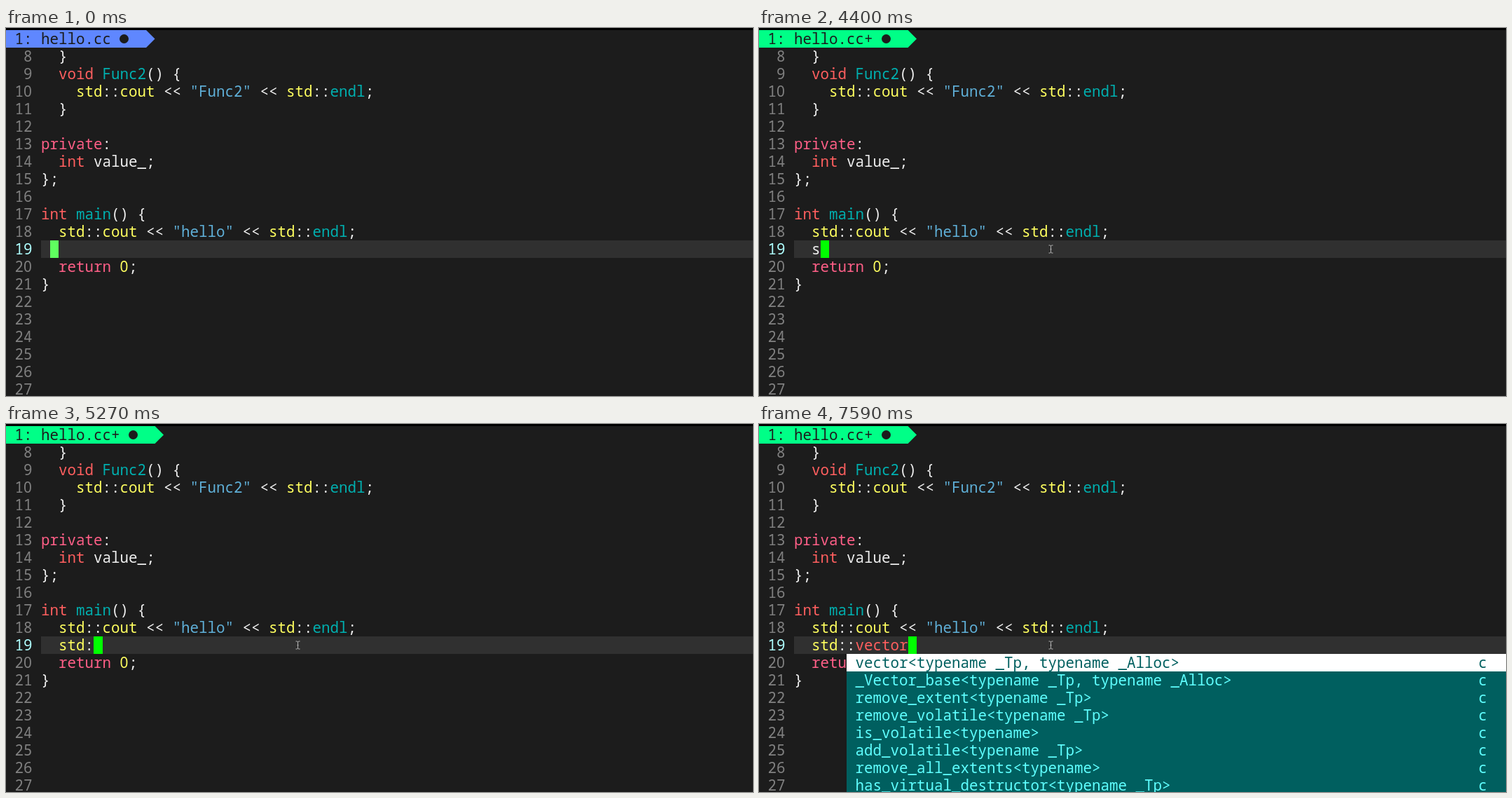
Animation of 1066x525 px, one loop 8 s. Source, as an HTML page:

```html
<!DOCTYPE html>
<html lang="en">
<head>
<meta charset="utf-8">
<title>Code completion</title>
<style>
  html, body { margin: 0; width: 100%; height: 100%; overflow: hidden; background: #1c1c1c; }
  #stage {
    position: relative; width: 1066px; height: 525px; overflow: hidden;
    background: #1c1c1c; color: #eee;
    font: 20.833px/25px "Noto Sans Mono", monospace;
    font-variant-ligatures: none; white-space: pre;
  }
  #stage > * { position: absolute; }
  #edge { left: 0; top: 0; width: 100%; height: 3px; background: #000; }
  #tab {
    left: 0; top: 3px; height: 25px; color: #1c1c1c; background: #5f87ff;
    clip-path: polygon(0 0, calc(100% - 12.5px) 0, 100% 50%, calc(100% - 12.5px) 100%, 0 100%);
  }
  #tab.dirty { background: #00ff87; }
  #tab i {
    position: absolute; right: 37.5px; top: 6px; width: 13px; height: 13px;
    border-radius: 50%; background: #1c1c1c;
  }
  #line { left: 50px; top: 303px; width: 1016px; height: 25px; background: #303030; }
  #caret { top: 303px; width: 12.5px; height: 25px; background: #5fff5f; }
  #caret.live { background: #0f0; }
  .row { left: 0; height: 25px; }
  .no { color: #808080; }
  .now { color: #afffff; }
  .red { color: #ff5f5f; }
  .pink { color: #ff5f87; }
  .teal { color: #00afaf; }
  .yellow { color: #ffff5f; }
  .blue { color: #5fafd7; }
  .zero { font-family: "Noto Sans", sans-serif; letter-spacing: .028em; }
  #menu { top: 328px; right: 0; height: 200px; overflow: hidden; background: #005f5f; color: #5fffff; }
  #menu div { position: relative; height: 25px; padding-left: 12.5px; }
  #menu .on { background: #fff; color: #005f5f; }
  #menu b { position: absolute; right: 27px; font-weight: normal; }
  #mouse { left: 0; top: 0; }
</style>
</head>
<body>
<div id="stage">
  <div id="edge"></div>
  <div id="tab"><span></span><i></i></div>
  <div id="line"></div>
  <div id="caret"></div>
  <div id="menu"></div>
  <svg id="mouse" width="9" height="13" viewBox="-4.5 -6.5 9 13" fill="none" stroke="#b4b4b4" stroke-width="1">
    <path d="M-3 -5.5H-1L0 -4.5L1 -5.5H3M-3 5.5H-1L0 4.5L1 5.5H3M0 -4.5V4.5M-1 0H1"/>
  </svg>
</div>
<script>
const LOOP = 8000, CELL = 12.5, ROW = 25, TOP = 28, FIRST = 8, ACTIVE = 19;
const $ = id => document.getElementById(id);

const code = `  }
  void Func2() {
    std::cout << "Func2" << std::endl;
  }

private:
  int value_;
};

int main() {
  std::cout << "hello" << std::endl;

  return 0;
}`.split("\n");

const menus = {
  st: { col: 5, items: ["size_t", "sigset_t", "ssize_t", "suseconds_t", "std::", "stdin",
    "stime( const time_t *__when )", "static"] },
  std: { col: 5, items: ["std::", "stdin", "stderr", "stdout", "STDC_HEADERS", "STA_DEL",
    "strtod( const char *__restrict __nptr, char **__restrict __endptr )",
    "strtold( const char *__restrict __nptr, char **__restrict __endptr )"] },
  scope: { col: 10, items: ["calloc( size_t __nmemb, size_t __size )",
    "front_insert_iterator<typename _Container>",
    "moneypunct_byname<typename _CharT, bool _Intl>", "isxdigit( int )",
    "printf( const char *__restrict __format, ... )",
    "wcstok( wchar_t *__restrict __s, const wchar_t *__restrict __delim, wchar_t **__restrict __ptr )",
    "sprintf( char *__restrict __s, const char *__restrict __format, ... )",
    "add_pointer<typename _Tp>"] },
  vec: { col: 10, kind: "c", items: ["vector<typename _Tp, typename _Alloc>",
    "_Vector_base<typename _Tp, typename _Alloc>", "remove_extent<typename _Tp>",
    "remove_volatile<typename _Tp>", "is_volatile<typename>", "add_volatile<typename _Tp>",
    "remove_all_extents<typename>", "has_virtual_destructor<typename _Tp>"] }
};

// Each step: start time, typed text, open menu, first item picked
const steps = [
  [0, ""], [4400, "s"], [4550, "st"], [4640, "st", "st"],
  [4790, "std"], [4870, "std", "std"],
  [5270, "std:"], [5350, "std::"], [5420, "std::", "scope"],
  [6490, "std::v"], [6580, "std::ve"], [6670, "std::ve", "vec"],
  [7590, "std::vector", "vec", true]
];

// Each move: start, end, number of hops, from, to
const moves = [
  [110, 600, 7, [900, 492], [507, 242]],
  [820, 990, 3, [500, 243], [466, 251]],
  [2850, 3170, 5, [465, 253], [414, 324]],
  [3400, 3400, 1, [416, 315], [416, 315]]
];

const rules = [
  ["blue", /"[^"]*"/], ["yellow", /\b(?:std|cout|0)\b/], ["teal", /\b(?:Func2|endl|main)\b/],
  ["red", /\b(?:void|int|vector)\b/], ["pink", /\b(?:private|return)\b/]
];
const lexer = new RegExp(rules.map(r => `(${r[1].source})`).join("|"), "g");
const escape = s => s.replace(/</g, "&lt;").replace(/>/g, "&gt;");
const plainZero = s => s.replace(/0/g, '<span class="zero">0</span>');

function paint(text) {
  let html = "", end = 0;
  for (const m of text.matchAll(lexer)) {
    const name = rules[m.slice(1).findIndex(g => g !== undefined)][0];
    html += escape(text.slice(end, m.index)) +
      `<span class="${name}">${plainZero(escape(m[0]))}</span>`;
    end = m.index + m[0].length;
  }
  return html + escape(text.slice(end));
}

function addRow(n) {
  const row = document.createElement("div");
  row.className = "row";
  row.style.top = TOP + (n - FIRST) * ROW + "px";
  const tone = n === ACTIVE ? "now" : "no";
  row.innerHTML = `<span class="${tone}">${plainZero(String(n).padStart(3))}</span> <span>${paint(code[n - FIRST] || "")}</span>`;
  $("stage").insertBefore(row, $("menu"));
  return row.lastChild;
}

let typed;
for (let n = FIRST; n <= 27; n++) {
  const text = addRow(n);
  if (n === ACTIVE) typed = text;
}

function showStep([, text, menuName, picked]) {
  const dirty = text !== "";
  $("tab").className = dirty ? "dirty" : "";
  $("tab").firstChild.textContent = dirty ? " 1: hello.cc+" : " 1: hello.cc";
  $("tab").style.width = (dirty ? 18 : 17) * CELL + "px";
  typed.innerHTML = paint("  " + text);

  const menu = menus[menuName];
  $("menu").hidden = !menu;
  if (!menu) return;
  $("menu").style.left = menu.col * CELL + "px";
  $("menu").innerHTML = menu.items.map((item, i) =>
    `<div${picked && i === 0 ? ' class="on"' : ""}>${escape(item)}${menu.kind ? `<b>${menu.kind}</b>` : ""}</div>`
  ).join("");
}

function mouseAt(t) {
  const move = moves.findLast(m => t >= m[0]);
  if (!move) return null;
  const [start, end, hops, from, to] = move;
  const last = hops - 1;
  const hop = last ? Math.min(last, Math.floor((t - start) / (end - start) * last + .05)) : 0;
  const p = last ? hop / last : 1;
  const eased = p * (2 - p);
  return from.map((v, i) => Math.round(v + (to[i] - v) * eased));
}

let shown;
function draw(now) {
  const t = now % LOOP;
  const step = steps.findLast(s => t >= s[0]);
  if (step !== shown) showStep(shown = step);

  const col = t < 3940 ? 5 : 6 + step[1].length;
  $("caret").style.left = col * CELL + "px";
  $("caret").className = t < 3580 ? "" : "live";

  const spot = mouseAt(t);
  $("mouse").style.visibility = spot ? "visible" : "hidden";
  if (spot) $("mouse").style.transform = `translate(${spot[0] - 4}px, ${spot[1] - 6}px)`;
  requestAnimationFrame(draw);
}
draw(0);
const begin = performance.now();
requestAnimationFrame(function sync() { draw(performance.now() - begin); });
</script>
</body>
</html>
```
